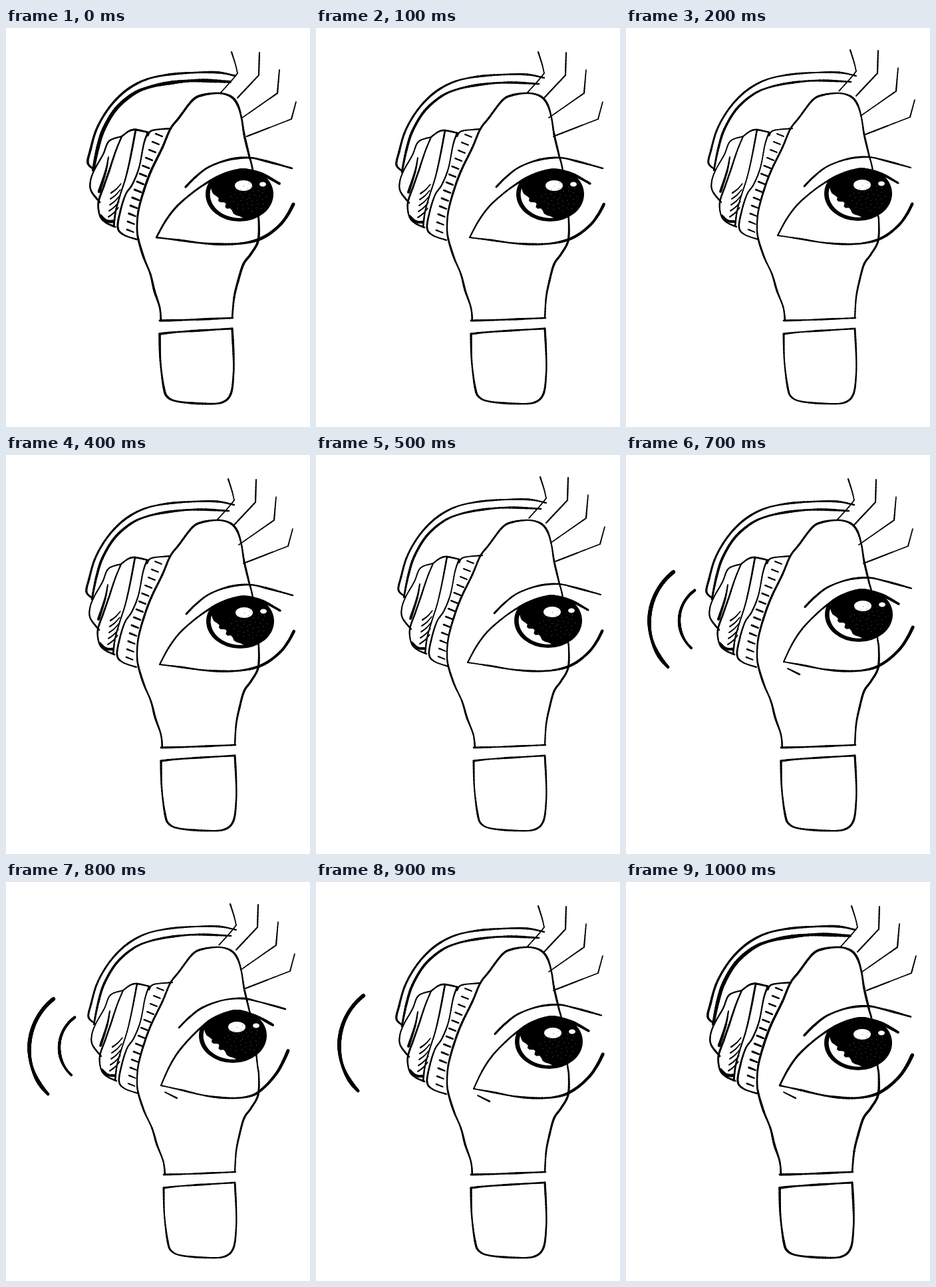
Recreate the animation shown at these times as an HTML page with a canvas. Size 457x600 px, loop 1100 ms.

```html
<!DOCTYPE html>
<html>
<head>
<meta charset="utf-8">
<style>
html, body { margin: 0; width: 100%; height: 100%; overflow: hidden; background: #fff; }
canvas { display: block; }
</style>
</head>
<body>
<canvas id="stage" width="457" height="600"></canvas>
<script>
const ctx = document.getElementById("stage").getContext("2d");
ctx.lineCap = ctx.lineJoin = "round";

const clamp = v => Math.max(0, Math.min(1, v));
const points = text => text.trim().split(/\s+/).map(p => p.split(",").map(Number));
const shift = (dx, dy) => ([x, y]) => [x + dx, y + dy];

function smooth(pts) {
  const at = i => pts[Math.max(0, Math.min(pts.length - 1, i))], out = [];
  for (let i = 0; i < pts.length - 1; i++) {
    const [a, b, c, d] = [at(i - 1), at(i), at(i + 1), at(i + 2)];
    for (let t = 0; t <= 1; t += 0.125) {
      out.push([0, 1].map(k => b[k] + t / 2 * (c[k] - a[k] +
        t * (2 * a[k] - 5 * b[k] + 4 * c[k] - d[k] + t * (3 * (b[k] - c[k]) + d[k] - a[k])))));
    }
  }
  return out;
}

// A pen line whose width runs from w0 to w1 and wavers a little
function pen(pts, w0, w1 = w0) {
  const line = smooth(pts);
  line.slice(1).forEach(([x, y], i) => {
    ctx.lineWidth = (w0 + (w1 - w0) * i / line.length) * (1 + 0.15 * Math.sin(x * 0.11 + y * 0.07));
    ctx.beginPath();
    ctx.moveTo(...line[i]);
    ctx.lineTo(x, y);
    ctx.stroke();
  });
}

// Several strokes separated by "/", each point passed through move
function ink(text, move, w0, w1) {
  for (const part of text.split("/")) pen(points(part).map(move), w0, w1);
}

function trace(pts) {
  ctx.beginPath();
  for (const [x, y] of pts) ctx.lineTo(x, y);
}

// Three redrawings of the figure: pen weight, offsets of its parts, shift of the left and right foot
const takes = {
  A: { weight: 3, band: 4.8, lash: [0, 0], ear: [0, 0], arch: [0, 0], foot: [0, 0] },
  B: { weight: 2.5, band: 3, lash: [-2, -3], ear: [2, 0], arch: [1, 0], foot: [6, 4] },
  C: { weight: 2.7, band: 3.2, lash: [-5, 0], ear: [-1, 1], arch: [-2, 3], foot: [2, 4] }
};

const outline = `233,440 231,420 223,395 217,370 207,345 199,318 197,300 199,275 207,245 218,215 235,180 247,152
  260,135 280,109 295,101 320,98 338,103 348,115 354,135 358,160 365,190 371,215 378,275 380,290 379,320 368,340
  357,355 349,380 343,405 340,436`;
const base = `231,440 270,439 341,436 / 231,460 260,457 340,452
  / 340,452 342,490 342,520 338,550 325,563 300,565 260,562 243,555 237,540 232,500 231,460`;
const lashes = `339,36 345,55 348,68 / 348,68 340,78 322,98 / 381,37 380,71 / 380,71 348,105
  / 411,63 408,98 / 408,98 355,135 / 436,111 429,137 / 429,137 362,163`;
const arch = "133,213 123,203 127,183 135,155 148,130 165,108 186,90 212,77 245,70 285,67 320,67 345,72";
const archInner = "131,214 138,180 147,152 165,122 190,100 215,89 250,82 290,79 337,81";
const cushions = `174,163 155,170 146,190 133,213 127,230 128,245 141,262
  / 174,163 165,185 155,215 147,238 139,262 141,282 149,292 164,299
  / 174,163 185,155 195,153 214,157 / 195,153 187,195 180,225 172,250 165,275 162,298
  / 213,157 207,175 200,210 190,235 180,250 172,275 168,300 177,311 197,318 / 213,162 220,154 248,151`;

function drawFigure({ weight, band, lash, ear, arch: archShift, foot }) {
  const stand = ([x, y]) => {
    const side = clamp((x - 235) / 105);
    return [x + (foot[0] + (foot[1] - foot[0]) * side) * clamp((y - 330) / 100), y];
  };
  ink(outline, stand, weight);
  ink(base, stand, weight);
  ink(lashes, shift(...lash), 1.9);
  ink(arch, shift(...archShift), weight);
  ink(archInner, shift(...archShift), band);

  const worn = shift(...ear);
  ink(cushions, worn, weight * 0.85);
  ink("154,194 150,215 140,246", worn, 2, weight * 1.4);
  ink("142,282 151,290 161,291", worn, weight * 1.5);
  for (let i = 0; i < 5; i++) {
    const x = 173 - i, y = 234 + i * 9;
    pen([[x, y], [x - 7, y + 8], [x - 15, y + 14]].map(worn), 1.5, 2.4);
  }
  // Ribs along the rim of the ear cup
  for (let i = 0; i < 13; i++) {
    const y = 162 + i * 12, x = 236 - 44 * Math.sin(i / 13 * 1.5);
    pen([[x - 11, y - 3], [x - 1, y + 1]].map(worn), weight * 0.9, weight * 0.7);
  }
}

// Eye poses: inner corner, then how far lid, iris and brow move together
const eyes = {
  A1: [226, 315, 0, 0], B1: [228, 312, -2, -1], C1: [231, 315, 1, 0],
  A2: [231, 306, -2, -8], B2: [233, 306, -10, -19], C2: [237, 311, -1, -10]
};
const upperLid = "226,315 240,290 257,268 280,248 300,234 318,224 340,216 360,213 385,220 411,234";
const lowerLid = "226,315 260,319 300,324 340,325 370,321 392,312 412,296 424,280 432,265";
const brow = "270,239 285,224 305,209 335,198 365,195 390,200 430,211";

function drawEye([cornerX, cornerY, dx, dy], weight, raised) {
  const pull = ([x, y], mx, my) => {
    const near = clamp((326 - x) / 100);
    return [x + (cornerX - 226) * near + mx, y + (cornerY - 315) * near + my];
  };
  const lid = points(upperLid).map(p => {
    const far = clamp((p[0] - 226) / 100);
    return pull(p, dx * far, dy * far);
  });

  ctx.save();
  trace([...smooth(lid), [440, 400], [200, 400]]);
  ctx.clip();
  drawIris(351 + dx, 250 + dy);
  ctx.restore();

  pen(lid, weight * 0.8, weight * 1.5);
  pen(points(lowerLid).map(p => {
    const end = clamp((p[0] - 370) / 60);
    return pull(p, dx * 0.8 * end, dy * 0.6 * end);
  }), weight * 0.8, weight * 1.7);
  ink(brow, shift(dx, dy * 1.05), weight);
  if (raised) pen([[cornerX + 6, cornerY + 10], [cornerX + 24, cornerY + 19]], 2.2);
}

function drawIris(x, y) {
  const polar = (angle, r) => [x + 51 * r * Math.cos(angle), y + 41 * r * Math.sin(angle)];
  const ellipse = (cx, cy, rx, ry, color) => {
    ctx.fillStyle = color;
    ctx.beginPath();
    ctx.ellipse(cx, cy, rx, ry, 0, 0, 7);
    ctx.fill();
  };
  ellipse(x, y, 51, 41, "#000");

  // Crescent of light with a jagged inner edge
  const rim = [], edge = [];
  for (let i = 0; i <= 16; i++) {
    const u = i / 16, angle = 1.45 + 1.95 * u;
    rim.push(polar(angle, 0.87));
    edge.unshift(polar(angle, 0.87 - Math.sin(Math.PI * u) * (i % 4 < 2 ? 0.34 : 0.24)));
  }
  trace([...rim, ...edge]);
  ctx.fillStyle = "#fff";
  ctx.fill();

  ellipse(x + 6, y - 13, 13, 8, "#fff");
  ellipse(x + 35, y - 15, 5, 3.5, "#fff");
  // Gaps in the scribbled pupil
  ctx.fillStyle = "#666";
  for (let i = 0; i < 40; i++) {
    const [px, py] = polar(i * 2.4, 0.55 * Math.sqrt(i / 40));
    ctx.fillRect(px + 14, py + 5, 1, 1);
  }
}

// Sound waves: arcs opening to the right
function wave(x, y, radius, spread, width) {
  const arc = [];
  for (let a = -spread; a <= spread; a += spread / 8) {
    arc.push([x - radius * Math.cos(a), y + radius * Math.sin(a)]);
  }
  pen(arc, width);
}
const nearWave = () => wave(162, 248, 45, 0.43, 4);
const innerWave = () => wave(136, 249, 56, 0.95, 3.8);
const outerWave = y => wave(131, y, 96, 0.9, 5);

const order = "ACBACBACBCA";
const waves = {
  6: nearWave,
  7: () => { innerWave(); outerWave(251); },
  8: () => { innerWave(); outerWave(251); },
  9: () => outerWave(246)
};

function draw(step) {
  const name = order[step], raised = step >= 6;
  ctx.fillStyle = "#fff";
  ctx.fillRect(0, 0, 457, 600);
  ctx.strokeStyle = "#000";
  drawFigure(takes[name]);
  drawEye(eyes[name + (raised ? 2 : 1)], takes[name].weight, raised);
  if (waves[step]) waves[step]();
}

let shown = -1;
function tick() {
  const step = Math.floor(performance.now() % 1100 / 100);
  if (step !== shown) draw(shown = step);
  requestAnimationFrame(tick);
}
tick();
</script>
</body>
</html>
```
